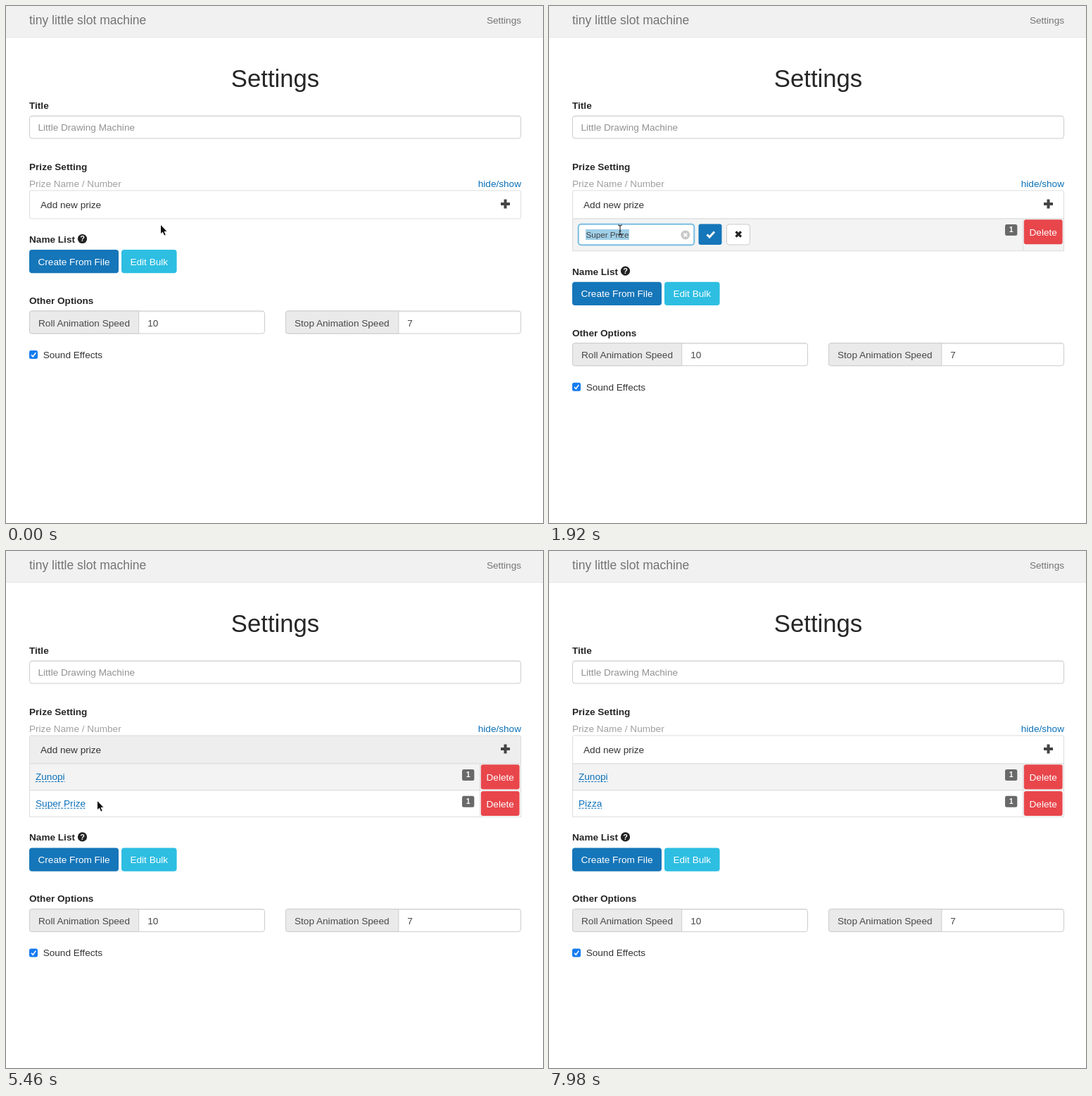
Recreate the animation shown at these times as an HTML page. Size 763 px wide and 734 px high, loop 8000 ms.

```html
<!DOCTYPE html>
<html lang="en">
<head>
<meta charset="utf-8">
<title>Slot machine settings</title>
<style>
html, body { margin: 0; width: 100%; height: 100%; overflow: hidden; background: #fff; }
svg { display: block; font: 13.6px "Liberation Sans", Arial, sans-serif; }
text { white-space: pre; }
</style>
</head>
<body>
<svg id="stage" width="763" height="734" viewBox="0 0 763 734"></svg>
<script>
const LOOP = 8000, TICK = 60;
const BLUE = '#1576b9', LINK = '#0b70b8', LINE = '#ddd', INK = '#262626';
const ADD = 480, ADD2 = 4680;                       // clicks on "Add new prize"
const edits = [
  { from: 1500, to: 3600, text: 'Zunopi', keys: [2640, 2880, 3060, 3180, 3300, 3420] },
  { from: 5880, to: 7860, text: 'Pizza', keys: [6900, 7140, 7380, 7500, 7680] }
];
const path = [                                      // time, x, y of the pointer tip
  [0, 219.5, 310], [120, 219.5, 310], [360, 220, 288], [780, 220, 288], [1200, 101, 318],
  [3960, 101, 318], [4440, 318, 281], [5220, 318, 281], [5460, 129.5, 354],
  [5760, 95.5, 355], [LOOP, 95.5, 355]
];

const stage = document.getElementById('stage');
const pen = document.createElement('canvas').getContext('2d');
const width = (s, size) => {
  pen.font = size + 'px "Liberation Sans", Arial, sans-serif';
  return pen.measureText(s).width;
};

const text = (x, y, s, fill = INK, more = '') => `<text x="${x}" y="${y}" fill="${fill}" ${more}>${s}</text>`;
const bold = (x, y, s) => text(x, y, s, INK, 'font-weight="700"');
const rect = (x, y, w, h, fill, more = '') =>
  `<rect x="${x}" y="${y}" width="${w}" height="${h}" fill="${fill}" ${more}/>`;
const box = (x, y, w, h, fill = '#fff', stroke = '#ccc', rx = 3.5) =>
  rect(x, y, w, h, fill, `stroke="${stroke}" rx="${rx}"`);
const stroke = (d, color, w, more = '') =>
  `<path d="${d}" fill="none" stroke="${color}" stroke-width="${w}" ${more}/>`;
const group = (x, y, body) => `<g transform="translate(${x} ${y})">${body}</g>`;
const cross = (x, y, r, color, w) =>
  stroke(`M${x - r} ${y - r}l${2 * r} ${2 * r}m0 ${-2 * r}l${-2 * r} ${2 * r}`, color, w);
const field = (x, y, w, h) => box(x, y, w, h) + stroke(`M${x + 2} ${y + 1}h${w - 4}`, '#000', 1, 'opacity=".08"');

function pointerAt(t) {
  const i = path.findIndex(p => p[0] > t);
  const [t0, x0, y0] = path[i - 1], [t1, x1, y1] = path[i];
  const u = (t - t0) / (t1 - t0), k = u * u * (3 - 2 * u);
  return { x: x0 + (x1 - x0) * k, y: y0 + (y1 - y0) * k };
}

const shapes = {
  arrow: '<path d="M0 0V14L3.1 11.2 5.2 16.2 7.8 15.1 5.7 10.3H9.8Z" fill="#111" stroke="#fff"/>',
  hand: '<path d="M-1.7 1.3C-1.7-.7 1.1-.7 1.4 1.3L2 5.2C2.6 3.8 4.4 4 4.7 5.2 5.4 4.5 7 4.8 7 6 8 5.5 9 6 9 7.2V10.5C9 12.5 8 13.2 8 15.5H1C.6 13.2-2.6 10.8-3.9 8.7-4.8 7-3 6.1-2 7.2L-.6 8.5Z" fill="#fff" stroke="#222"/>'
    + stroke('M2.6 9.5v3.6M4.6 9.5v3.6M6.5 9.5v3.6', '#333', .8),
  beam: stroke('M-3-7Q0-7 0-5Q0-7 3-7M0-5V5M-3 7Q0 7 0 5Q0 7 3 7M-1.5 1.5h3', '#222', 1.1)
};

function header() {
  return rect(0, 0, 763, 44, '#f1f1f1') + rect(0, 44, 763, 1, '#e6e6e6')
    + text(33, 26, 'tiny little slot machine', '#747474', 'font-size="17.5"')
    + text(732, 24.5, 'Settings', '#747474', 'text-anchor="end"')
    + text(382.5, 115, 'Settings', INK, 'font-size="34.7" text-anchor="middle"')
    + bold(33, 146, 'Title') + field(33.5, 156, 698, 32)
    + text(45.5, 177, 'Little Drawing Machine', '#929292')
    + bold(33, 232.5, 'Prize Setting')
    + text(33, 257, 'Prize Name / Number', '#a0a0a0')
    + text(732, 257, 'hide/show', LINK, 'text-anchor="end"');
}

function addRow(active) {
  return rect(33.5, 262, 698, 40, active ? '#eee' : '#fff', `stroke="${LINE}" rx="2"`)
    + text(49, 287, 'Add new prize', '#333')
    + stroke('M703 281h13M709.5 274.5v13', '#444', 4);
}

function editor(e, t) {
  const typed = e.text.slice(0, e.keys.filter(k => k <= t).length);
  const glow = Math.min(1, (t - e.from + 30) / 180);
  const end = 52.5 + width(typed || 'Super Prize', 11.66);
  return rect(42, 8, 164, 29, 'none', `rx="4" stroke="#66bbe9" stroke-width="3.5" opacity="${glow * .4}"`)
    + box(42, 8, 164, 29, '#fff', glow < .5 ? '#ccc' : '#3f9fd3', 3)
    + (typed ? rect(end + .3, 16, 1, 14, '#222') : rect(52, 15, end - 51.5, 15, '#9fcfe8'))
    + text(52.5, 26.7, typed || 'Super Prize', '#444', 'font-size="11.66"')
    + '<circle cx="193.8" cy="23" r="6.4" fill="#c8c8c8"/>' + cross(193.8, 23, 2.4, '#fff', 2)
    + rect(212.5, 7.5, 33, 29.5, BLUE, 'rx="3"')
    + stroke('M224.5 22.5l3.5 3.5 7-7.5', '#fff', 3)
    + box(252.5, 8, 33, 29) + cross(269.2, 22, 3.7, '#222', 3.2);
}

function prizeRow(i, y, h, t, hovered) {
  const e = edits[i], name = t < e.to ? 'Super Prize' : e.text, color = hovered ? '#285577' : LINK;
  const editing = t >= e.from && t < e.to;
  return group(0, y,
    rect(33.5, 0, 698, h, i ? '#fff' : '#f3f3f3', `stroke="${LINE}"`)
    + stroke(`M673.5 0v${h}`, LINE, 1)
    + (editing ? editor(e, t)
      : text(42, 23, name, color)
        + stroke(`M42 25.5h${width(name, 13.6)}`, color, 1, 'stroke-dasharray="3 1.5"'))
    + rect(648, 8, 17.3, 16, '#696969', 'rx="2.5"')
    + text(656.6, 19.2, 1, '#fff', 'font-size="10.5" font-weight="700" text-anchor="middle"')
    + rect(674.8, 1.2, 54.8, 35, '#e8464b', 'rx="3"')
    + text(702.2, 24, 'Delete', '#fff', 'text-anchor="middle"'));
}

function speed(x, split, right, label, value) {
  return field(x, 433, right - x, 32)
    + stroke(`M${split} 433H${x + 3}q-3 0-3 3v26q0 3 3 3H${split}z`, '#ccc', 1).replace('none', '#eaeaea')
    + text(x + 12.5, 454.5, label, '#484848') + text(split + 12.5, 454.5, value, '#484848');
}

const footer = bold(33, 336, 'Name List')
  + '<circle cx="108.5" cy="330.5" r="6.6" fill="#222"/>'
  + text(108.5, 334.4, '?', '#fff', 'font-size="11" font-weight="700" text-anchor="middle"')
  + rect(33, 346, 127, 33.3, BLUE, 'rx="4"') + text(96.5, 367.7, 'Create From File', '#fff', 'text-anchor="middle"')
  + rect(164, 346, 78.6, 33.3, '#2dbee2', 'rx="4"') + text(203.3, 367.7, 'Edit Bulk', '#fff', 'text-anchor="middle"')
  + bold(33, 423, 'Other Options')
  + speed(33.5, 188.7, 367.5, 'Roll Animation Speed', 10)
  + speed(397.5, 557.8, 731.5, 'Stop Animation Speed', 7)
  + rect(33, 489, 12, 12, '#157cf0', 'rx="2.5"') + stroke('M36 495.3l2.3 2.5 4-5.6', '#fff', 1.6)
  + text(52.7, 500, 'Sound Effects', '#333');

function draw(now) {
  const t = Math.floor(now % LOOP / TICK) * TICK;
  const count = (t >= ADD) + (t >= ADD2);
  const active = edits.find(e => t >= e.from && t < e.to);
  const p = pointerAt(t);
  const onAdd = !active && p.y > 262 && p.y < 302;
  const focused = t >= ADD && t < edits[0].from || t >= ADD2 && t < edits[1].from;
  const hidden = t >= edits[0].keys[0] && t < 3960 || t >= edits[1].keys[0];

  let y = 302, rows = '', onLink = false;
  for (let i = 0; i < count; i++) {
    const h = active === edits[i] ? 45.7 : 37.7;
    const over = !hidden && !active && p.x > 42 && p.x < 113 && p.y > y + 9 && p.y < y + 27;
    rows += prizeRow(i, y, h, t, over);
    onLink = onLink || over;
    y += h;
  }

  const kind = active ? 'beam' : onAdd || onLink ? 'hand' : 'arrow';
  stage.innerHTML = header() + addRow(!hidden && onAdd || focused) + rows
    + group(0, y - 302, footer) + (hidden ? '' : group(p.x, p.y, shapes[kind]));
}

function frame() {
  draw(performance.now());
  requestAnimationFrame(frame);
}
frame();
</script>
</body>
</html>
```
